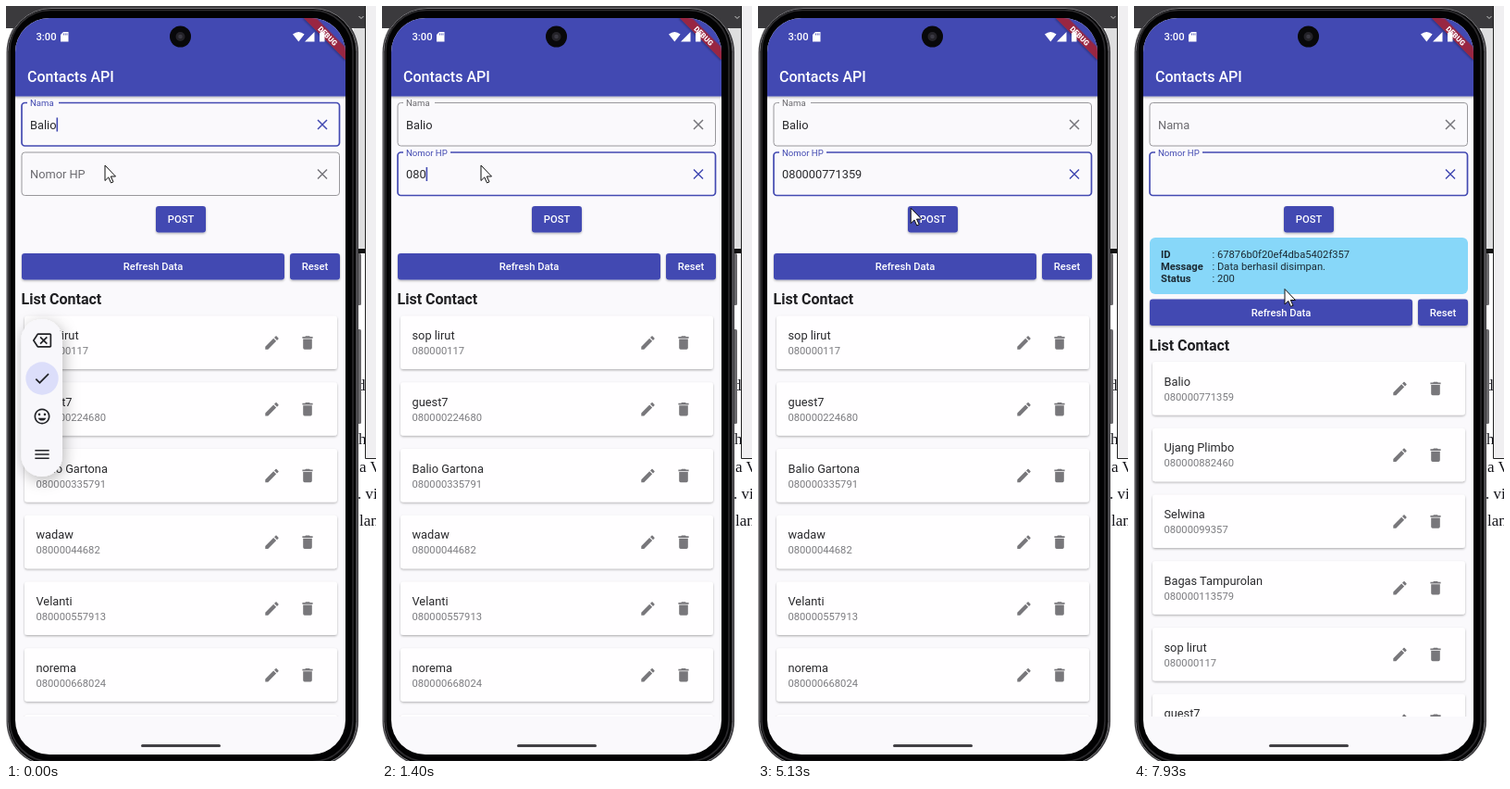
Recreate the animation shown at these times as an HTML page. Size 400 by 815 pixels, loop 8 s.

```html
<!DOCTYPE html>
<html lang="id">
<head>
<meta charset="utf-8">
<title>Contacts API</title>
<style>
  html, body { margin: 0; width: 100%; height: 100%; overflow: hidden; background: #fff; }
  svg { display: block; width: 400px; height: 815px; font: 12.8px Roboto, sans-serif; }
  text { white-space: pre; }
  .page { font: 17px "Liberation Serif", serif; fill: #16161c; }
  .btn rect { fill: #434ab2; filter: url(#lift); }
  .btn text { font-size: 11.2px; font-weight: 500; fill: #fff; text-anchor: middle; }
  .card rect { fill: #fffeff; filter: url(#lift); }
  .card text { fill: #29292c; }
  .card .phone { font-size: 11.2px; fill: #7b7b7f; }
  .card use { fill: #78777b; }
  .info text { font-size: 11.2px; fill: #1c2a33; }
  .info .key { font-weight: 700; }
  .cross { fill: none; stroke-width: 1.5; }
  .tools use { fill: #222327; }
</style>
</head>
<body>
<svg viewBox="0 0 400 815">
  <defs>
    <filter id="lift" x="-10%" y="-20%" width="120%" height="150%">
      <feDropShadow dx="0" dy="1.2" stdDeviation="1.1" flood-color="#000" flood-opacity=".3"/>
    </filter>
    <filter id="float" x="-100%" y="-30%" width="300%" height="160%">
      <feDropShadow dx="2" dy="4" stdDeviation="8" flood-color="#000" flood-opacity=".28"/>
    </filter>
    <clipPath id="screen"><rect x="10" y="13" width="357" height="795" rx="37"/></clipPath>
    <clipPath id="listClip"><rect x="10" y="326" width="357" height="441"/></clipPath>
    <path id="edit" d="M3 17.25V21h3.75L17.81 9.94l-3.75-3.75zM20.71 7.04c.39-.39.39-1.02 0-1.41l-2.34-2.34c-.39-.39-1.02-.39-1.41 0l-1.83 1.83 3.75 3.75z"/>
    <path id="trash" d="M6 19c0 1.1.9 2 2 2h8c1.1 0 2-.9 2-2V7H6zM19 4h-3.5l-1-1h-5l-1 1H5v2h14z"/>
    <path id="erase" d="M22 3H7c-.69 0-1.23.35-1.59.88L0 12l5.41 8.11c.36.53.9.89 1.59.89h15c1.1 0 2-.9 2-2V5c0-1.1-.9-2-2-2zm0 16H7.07L2.4 12l4.66-7H22zm-11.59-2L14 13.41 17.59 17 19 15.59 15.41 12 19 8.41 17.59 7 14 10.59 10.41 7 9 8.41 12.59 12 9 15.59z"/>
    <path id="check" d="M9 16.17 4.83 12l-1.42 1.41L9 19 21 7l-1.41-1.41z"/>
    <path id="smile" fill-rule="evenodd" d="M12 2a10 10 0 1 0 .01 0zM12 4a8 8 0 1 1-.01 0zM8.5 8a1.5 1.5 0 1 0 .01 0zM15.5 8a1.5 1.5 0 1 0 .01 0zM6.9 14h10.2a5.5 5.5 0 0 1-10.2 0z"/>
    <path id="menu" d="M3 18h18v-2H3zM3 13h18v-2H3zM3 6v2h18V6z"/>
  </defs>

  <!-- desktop behind the phone -->
  <rect width="400" height="815" fill="#fff"/>
  <rect width="388" height="24" fill="#3b3a3d"/>
  <rect x="376" y="24" width="12" height="238" fill="#dededf"/>
  <rect x="376" y="262" width="12" height="5" fill="#111"/>
  <path d="M381.500 11l2.500 2.500 2.500-2.500" fill="none" stroke="#ccc"/>
  <g class="page">
    <text x="380" y="415">d</text><text x="381" y="473">h</text>
    <text x="382" y="503">a V</text><text x="380" y="532">. vie</text><text x="382" y="561">lan</text>
  </g>
  <path d="M388.500-2V488.500H402V-2z" fill="#f0eff1" stroke="#222"/>

  <!-- phone body -->
  <rect x="379" y="267" width="5" height="56" rx="1.500" fill="#6a696c"/>
  <rect x="379" y="349" width="5" height="102" rx="1.500" fill="#6a696c"/>
  <rect x=".5" y="1" width="380.500" height="820" rx="49" fill="#3c3b3e"/>
  <rect x="2" y="2.500" width="377" height="817" rx="47" fill="#050506" stroke="#77767a"/>
  <rect x="4" y="4.500" width="371" height="811" rx="44" fill="#020203" stroke="#2c2b2e" stroke-width="1.500"/>

  <g clip-path="url(#screen)">
    <rect x="10" y="13" width="357" height="795" fill="#faf9fc"/>
    <g id="fields"></g>
    <g class="btn" id="post"></g>
    <g class="info" id="info"></g>
    <g id="lower">
      <g class="btn" id="buttons"></g>
      <text x="16.500" y="322" font-size="16" font-weight="700" fill="#1f1f22">List Contact</text>
    </g>
    <g clip-path="url(#listClip)"><g id="before"></g><g id="after"></g></g>

    <rect x="0" y="0" width="380" height="97.500" fill="#434ab2" filter="url(#lift)"/>
    <text x="23" y="82" font-size="16" font-weight="500" fill="#fff">Contacts API</text>
    <g transform="translate(367 13) rotate(45)">
      <rect x="-32" y="22.400" width="64" height="9.600" fill="#992743" filter="url(#lift)"/>
      <text y="30" font-size="8" font-weight="900" fill="#fff" text-anchor="middle">DEBUG</text>
    </g>
    <g fill="#fff">
      <text x="32.500" y="37" font-size="11.200" font-weight="500">3:00</text>
      <path d="M62 28h5.500v10.500H59V31z"/>
      <path d="M62.500 29.500v2M64.300 29.500v2M66 29.500v2" stroke="#434ab2" stroke-width=".8"/>
      <path d="M310 30.500q6.300-5 12.600 0L316.300 38.500zM333.500 28v10.500H323zM340 27.500h2.500v1.200h2v9.800h-5.500v-9.800h1z"/>
    </g>
    <rect x="146" y="797" width="86" height="3" rx="1.500" fill="#424145"/>

    <g id="tools" class="tools">
      <rect x="16.500" y="338" width="44.500" height="170" rx="22" fill="#f8f7fb" filter="url(#float)"/>
      <circle cx="39" cy="402" r="17.700" fill="#dcdefa"/>
    </g>
  </g>

  <circle cx="188.500" cy="33" r="11.500" fill="#08080a"/>
  <circle cx="188.500" cy="33" r="5" fill="#242329"/>
  <circle cx="188.500" cy="33" r="2.300" fill="#3b3a44"/>
  <path id="mouse" d="M0 0V16.500l3.800-3.600 2.700 6 2.500-1.100-2.700-5.800h5.200z" fill="#fff" stroke="#111"/>
</svg>

<script>
const DURATION = 8000, INDIGO = '#434ab2', SHIFT = 49.5;
const NAME = 'Balio', PHONE = '080000771359';
const FOCUS = 110, POSTED = 7500, RELOADED = 7850;

const older = [
  ['sop lirut', '080000117'], ['guest7', '080000224680'], ['Balio Gartona', '080000335791'],
  ['wadaw', '08000044682'], ['Velanti', '080000557913'], ['norema', '080000668024'], ['', '']
];
const newer = [
  [NAME, PHONE], ['Ujang Plimbo', '080000882460'], ['Selwina', '08000099357'],
  ['Bagas Tampurolan', '080000113579'], ...older
];

// [time, digits typed]
const typing = [[930, 1], [1060, 2], [1260, 3], [1460, 4], [1600, 5], [1860, 6], [2060, 7],
  [3260, 9], [3330, 11], [3930, 12], [POSTED, 0]];
// [from, to] while the caret shows in the phone field
const caretOn = [[FOCUS, 560], [860, 2260], [3060, 4260]];
// [time, x, y]
const mousePath = [[5060, 107, 172], [5130, 165, 218], [5260, 194, 226], [5460, 174, 224],
  [7800, 174, 224], [7920, 163, 305.5]];

const $ = id => document.getElementById(id);
const clamp = x => Math.max(0, Math.min(1, x));
const ease = x => { x = clamp(x); return x * x * (3 - 2 * x); };
const show = (el, on) => el.setAttribute('display', on ? 'inline' : 'none');
const icon = (id, x, y, s) =>
  `<use href="#${id}" transform="translate(${x - 12 * s} ${y - 12 * s}) scale(${s})"/>`;
const button = (x, y, w, label) =>
  `<rect x="${x}" y="${y}" width="${w}" height="28.5" rx="3.2"/>` +
  `<text x="${x + w / 2}" y="${y + 18.3}">${label}</text>`;

function card([name, phone], i) {
  const y = 334.5 + i * 71.75;
  return `<g class="card"><rect x="20" y="${y}" width="338" height="57.5" rx="3.2"/>
    <text x="32.5" y="${y + 25.5}">${name}</text>
    <text class="phone" x="32.5" y="${y + 41.5}">${phone}</text>
    ${icon('edit', 287.5, y + 29, .8)}${icon('trash', 326, y + 29, .8)}</g>`;
}

$('post').innerHTML = button(162, 216, 54, 'POST');
$('buttons').innerHTML = button(17, 267, 284, 'Refresh Data') + button(307, 267, 54, 'Reset');
$('before').innerHTML = older.map(card).join('');
$('after').innerHTML = newer.slice(0, 7).map(card).join('');
$('info').innerHTML = '<rect x="17" y="250" width="344" height="61" rx="6" fill="#87d7f9"/>' +
  [['ID', '67876b0f20ef4dba5402f357'], ['Message', 'Data berhasil disimpan.'], ['Status', '200']]
    .map(([key, value], i) => `<text class="key" x="29" y="${272 + i * 12.8}">${key}</text>` +
      `<text x="84.5" y="${272 + i * 12.8}">: ${value}</text>`).join('');
$('tools').innerHTML += ['erase', 'check', 'smile', 'menu']
  .map((id, i) => icon(id, 39, 361 + i * 41, .85)).join('');

// lift: 0 = label resting inside, 1 = label on the border
function field(y, label, gap, lift, focused, value, caretX) {
  const mid = y + 23.5, tint = focused ? INDIGO : '#6c6b70';
  const caret = caretX ? `<rect x="${caretX}" y="${mid - 7.5}" width="1.6" height="15" fill="${INDIGO}"/>` : '';
  return `<rect x="17" y="${y}" width="343.5" height="46.5" rx="3.4" fill="none"
      stroke="${focused ? INDIGO : '#98979b'}" stroke-width="${focused ? 1.7 : 1}"/>
    <rect x="${23 + gap / 2 * (1 - lift)}" y="${y - 2}" width="${gap * lift}" height="4" fill="#faf9fc"/>
    <text x="26" y="${mid + 4.6 - 24.6 * lift}" font-size="${12.8 - 3.2 * lift}" fill="${tint}">${label}</text>
    <text x="26" y="${mid + 4.6}" fill="#29292c">${value}</text>${caret}
    <path class="cross" stroke="${focused ? INDIGO : '#77767c'}" d="M337 ${mid - 5}l10 10m0-10l-10 10"/>`;
}

function mouseAt(t) {
  let a = mousePath[0];
  for (const b of mousePath) {
    if (t < b[0]) {
      const k = b === a ? 0 : (t - a[0]) / (b[0] - a[0]);
      return [a[1] + (b[1] - a[1]) * k, a[2] + (b[2] - a[2]) * k];
    }
    a = b;
  }
  return a.slice(1);
}

function draw(t) {
  const focused = t >= FOCUS, posted = t >= POSTED, reloaded = t >= RELOADED;
  const count = typing.reduce((n, [at, c]) => t >= at ? c : n, 0);
  const caret = caretOn.some(([from, to]) => t >= from && t < to);

  $('fields').innerHTML =
    field(104.5, 'Nama', 34, 1 - ease((t - POSTED) / 150), !focused, posted ? '' : NAME, !focused && 54.5) +
    field(158, 'Nomor HP', 51, ease((t - FOCUS) / 170), focused,
      PHONE.slice(0, count), caret && 26 + count * 7.19);

  show($('info'), posted);
  show($('before'), !reloaded);
  show($('after'), reloaded);
  const move = `translate(0 ${posted ? SHIFT : 0})`;
  for (const id of ['lower', 'before', 'after']) $(id).setAttribute('transform', move);

  $('tools').setAttribute('opacity', 1 - ease((t - 130) / 250));
  $('mouse').setAttribute('transform', `translate(${mouseAt(t)})`);
}

const start = performance.now();
function frame() {
  draw((performance.now() - start) % DURATION);
  requestAnimationFrame(frame);
}
frame();
</script>
</body>
</html>
```
